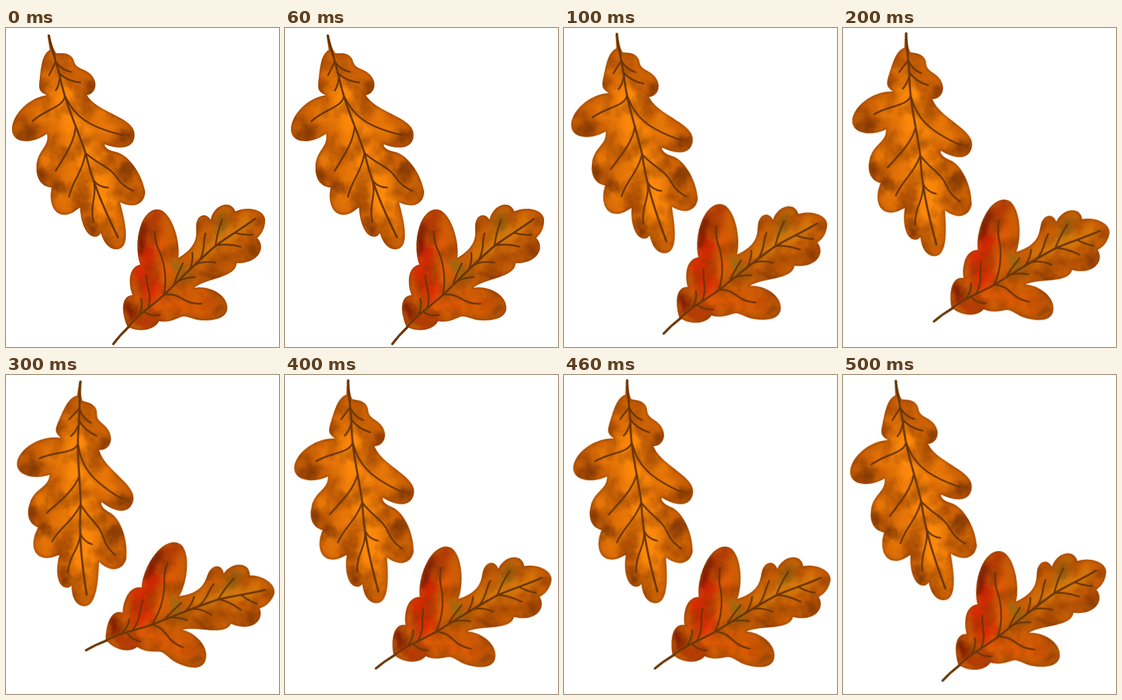
Recreate the animation shown at these times as an HTML page. Size 412 px wide and 480 px high, loop 600 ms.

```html
<!DOCTYPE html>
<html lang="en">
<head>
<meta charset="utf-8">
<title>Swaying oak leaves</title>
<style>
  html, body { margin: 0; width: 100%; height: 100%; overflow: hidden; background: #fff; }
  svg { display: block; width: 412px; height: 480px; }
  path { fill: none; stroke-linecap: round; stroke-linejoin: round; }

  .leaf { animation: .6s step-end infinite; }
  #amber { transform-origin: 116.5px 162.5px; animation-name: sway-amber; }
  #russet { transform-origin: 264.25px 370.75px; animation-name: sway-russet; }

  .veins { stroke: #6a3606; stroke-width: 2.6; }
  .rib { stroke-width: 3; }
  .stem { stroke-width: 3.6; }
  .rim { stroke: #8a3a02; stroke-width: 4; opacity: .5; filter: url(#soft); }
  .wash { filter: url(#bleed); }
  .clouds { filter: url(#mottle); }

  @keyframes sway-amber {
    0%, 100% { transform: none; }
    16.66%, 83.33% { transform: translate(.4px, 1.8px) rotate(5.5deg); }
    33.33%, 66.66% { transform: translate(1.5px, 3.7px) rotate(10.8deg); }
    50% { transform: translate(.5px, 7.1px) rotate(17.3deg); }
  }
  @keyframes sway-russet {
    0%, 100% { transform: none; }
    16.66%, 83.33% { transform: translate(-1.5px, -4.75px) rotate(5.8deg); }
    33.33%, 66.66% { transform: translate(-4px, -8.75px) rotate(12.8deg); }
    50% { transform: translate(-8.5px, -13.5px) rotate(22.8deg); }
  }
</style>
</head>
<body>
<svg viewBox="0 0 412 480">
  <defs>
    <filter id="soft" filterUnits="userSpaceOnUse" x="-20" y="-20" width="460" height="520">
      <feGaussianBlur stdDeviation="1.6"/>
    </filter>
    <!-- watercolour: blurred strokes with ragged borders -->
    <filter id="bleed" filterUnits="userSpaceOnUse" x="-20" y="-20" width="460" height="520" color-interpolation-filters="sRGB">
      <feGaussianBlur stdDeviation="6" result="blur"/>
      <feTurbulence type="fractalNoise" baseFrequency=".045" numOctaves="3" seed="4"/>
      <feDisplacementMap in="blur" scale="24" xChannelSelector="R" yChannelSelector="G"/>
    </filter>
    <!-- faint brown clouds -->
    <filter id="mottle" filterUnits="userSpaceOnUse" x="0" y="0" width="412" height="480" color-interpolation-filters="sRGB">
      <feTurbulence type="fractalNoise" baseFrequency=".03" numOctaves="4" seed="9"/>
      <feColorMatrix values="0 0 0 0 .5  0 0 0 0 .2  0 0 0 0 0  1.4 0 0 0 -.6"/>
    </filter>

    <path id="amber-edge" d="M63 10C64 20 65 27 66 33C54 40 53 60 51 76S50 96 62 101
      C34 105 10 130 9 152C9 174 38 176 62 159
      C66 180 46 184 46 210C46 230 56 239 69 240
      C64 262 72 281 88 281C100 281 106 273 112 270
      C112 292 122 316 136 314Q141 313 143 308
      C148 324 156 333 166 333C190 333 180 292 172 262
      C196 274 210 262 210 246C204 216 184 192 168 187C156 185 148 180 149 175
      C170 183 194 183 194 160C194 134 138 128 122 101
      C136 99 140 81 127 69C118 60 105 63 102 48C97 36 84 38 76 38C70 30 68 20 66 10Z"/>
    <path id="russet-edge" d="M183 449C174 428 173 403 191 402
      C185 388 183 360 203 356
      C193 334 199 273 229 273C247 273 264 316 260 346
      C280 334 289 322 287 302C286 281 301 276 309 289
      C312 268 338 256 346 276
      C366 267 391 274 391 289C391 305 383 312 379 316
      C392 328 384 354 348 354
      C347 376 302 376 284 391
      C308 387 334 402 334 421C334 436 316 440 300 440S275 433 267 434
      C257 436 250 444 231 441C224 455 200 459 183 449Z"/>
    <clipPath id="amber-clip"><use href="#amber-edge"/></clipPath>
    <clipPath id="russet-clip"><use href="#russet-edge"/></clipPath>
  </defs>

  <g id="amber" class="leaf">
    <g clip-path="url(#amber-clip)">
      <rect width="412" height="480" fill="#cd6205"/>
      <g class="wash">
        <path stroke="#e67607" stroke-width="34" d="M75 75L105 150L62 195M105 150L60 130M108 125L150 150M120 190L85 255M120 190L180 235M130 230L160 300"/>
        <path stroke="#fb880a" stroke-width="36" d="M88 100L120 190L148 262"/>
        <path stroke="#7e3503" stroke-width="18" d="M28 158h12M127 88h2M172 214h14M180 161h6M53 220v6M78 243h6M128 298v6"/>
      </g>
      <rect class="clouds" width="412" height="480"/>
      <use class="rim" href="#amber-edge"/>
    </g>
    <g class="veins">
      <path class="stem" d="M64.500 11.500Q67 25 73 42"/>
      <path class="rib" d="M66 18C73 44 79 62 82 76C90 115 107 149 120 188C130 230 145 266 169 315"/>
      <path d="M75 51Q70 61 65 71M76 52Q84 63 98 66M79 67Q92 80 112 82M81 75Q80 87 75 94"/>
      <path d="M89 102C87 119 60 122 40 140M90 104C103 132 124 149 176 161"/>
      <path d="M105 149C103 173 88 193 75 215M120 188C115 218 100 230 95 254"/>
      <path d="M121 189C140 206 156 208 168 226Q176 238 192 245"/>
      <path d="M132 229Q140 240 154 240M133 233C137 256 126 266 132 292"/>
    </g>
  </g>

  <g id="russet" class="leaf">
    <g clip-path="url(#russet-clip)">
      <rect width="412" height="480" fill="#c85e05"/>
      <g class="wash">
        <path stroke="#dd5a05" stroke-width="28" d="M235 320L242 365M222 415L300 415"/>
        <path stroke="#d4760a" stroke-width="24" d="M295 340L360 297"/>
        <path stroke="#b33a05" stroke-width="24" d="M222 285L212 315M205 440H220"/>
        <path stroke="#dc2a03" stroke-width="28" d="M214 338L207 385L222 395"/>
        <path stroke="#7f1604" stroke-width="18" d="M186 415V438M204 305L206 335"/>
        <path stroke="#986a10" stroke-width="16" d="M256 358L272 375M326 284L320 304"/>
        <path stroke="#8a3c04" stroke-width="14" d="M362 338H376M320 426H326M384 288v3M300 372H320"/>
      </g>
      <rect class="clouds" width="412" height="480"/>
      <use class="rim" href="#russet-edge"/>
    </g>
    <g class="veins">
      <path class="stem" d="M162 475.500Q172 462 185 450"/>
      <path class="rib" d="M180 455C198 432 218 420 238 402C264 377 290 350 316 328C333 315 353 304 376 287"/>
      <path d="M238 402C245 374 236 344 230 333Q226 325 224 306"/>
      <path d="M240 401C266 399 264 415 295 415"/>
      <path d="M202 430Q207 418 204 407M215 420C221 400 212 392 212 372M208 427Q219 434 232 432"/>
      <path d="M254 385Q257 374 267 354M257 383Q269 375 285 375"/>
      <path d="M277 364Q283 350 281 338M280 360Q292 349 316 353"/>
      <path d="M293 348C301 333 297 322 301 309M316 328Q319 307 326 289"/>
      <path d="M318 327Q335 324 354 329M345 308Q358 312 372 311"/>
    </g>
  </g>
</svg>
</body>
</html>
```
